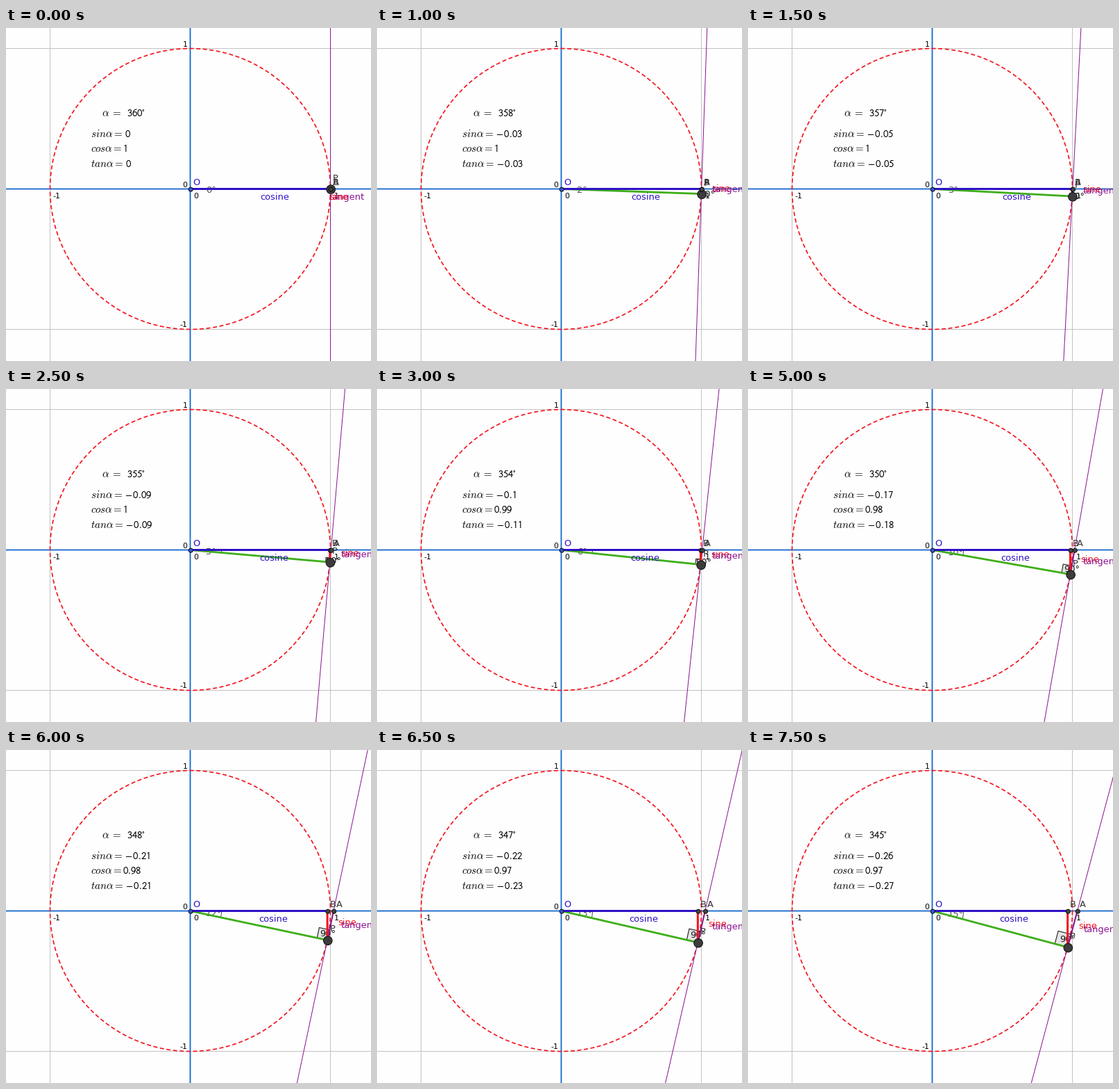
These frames come from a looping animation (526 by 479 pixels, 8000 ms). A matplotlib script:

```python
import matplotlib.pyplot as plt
import numpy as np
from matplotlib.animation import FuncAnimation

W, H, DPI = 526, 479, 64
PT = 72 / DPI                      # points per pixel
OX, OY, R = 265.5, 231.5, 202      # centre and radius of the unit circle
BLUE, GREEN, RED, PURPLE = "#2e12c6", "#3fae1a", "#f5141e", "#8a1490"
AXIS, DARK = "#1467cc", "#333333"

plt.rcParams.update({"font.family": "DejaVu Sans", "mathtext.fontset": "cm",
                     "path.snap": False})

fig = plt.figure(figsize=(W / DPI, H / DPI), dpi=DPI, facecolor="#fefefe")
ax = fig.add_axes([0, 0, 1, 1])


def line(xs, ys, color, width, z=3, **kw):
    kw.setdefault("solid_capstyle", "butt")
    ax.plot(xs, ys, color=color, lw=width * PT, zorder=z, **kw)


def text(x, y, s, color="black", size=13, z=7, **kw):
    ax.text(x, y, s, color=color, fontsize=size * PT, ha="left",
            va="baseline", zorder=z, **kw)


def sans_math(x, y, s):
    text(x, y, f"${s}$", size=14.7, math_fontfamily="stixsans")


def dot(x, y, r, fill):
    ax.add_patch(plt.Circle((x + 0.7, y + 0.7), r, fc=fill, ec="#101010",
                            lw=PT, zorder=6))


def number(v):
    s = f"{v:.2f}".rstrip("0").rstrip(".")
    return "0" if s == "-0" else s.replace("-", r"-\,")


def draw_plane():
    for x in (63.5, 467.5):
        line([x, x], [0, H], "#c2c2c2", 1, 1)
    for y in (29.5, 433.5):
        line([0, W], [y, y], "#c2c2c2", 1, 1)
    line([0, W], [OY, OY], AXIS, 1.8, 1)
    line([OX, OX], [0, H], AXIS, 1.8, 1)
    t = np.linspace(0, 2 * np.pi, 400)
    line(OX + R * np.cos(t), OY + R * np.sin(t), RED, 1.7, 2,
         dashes=(3.5, 2.15), dash_capstyle="butt")
    for x, y, s in ((254.5, 27, "1"), (254.5, 229, "0"), (250.5, 430.5, "-1"),
                    (67.5, 245, "-1"), (270.5, 245, "0"), (472.5, 245, "1")):
        text(x, y, s, size=11)


def draw_readout(n):
    a = np.radians(n)
    text(138.5, 127, r"$\alpha\;=$", size=15)
    sans_math(173.5, 127, rf"\mathsf{{{360 - n}}}\!{{}}^\circ")
    rows = (("sin", -np.sin(a), 171, 157), ("cos", np.cos(a), 168.5, 178),
            ("tan", -np.tan(a), 171.5, 200))
    for name, v, x, y in rows:
        text(122.5, y, rf"${name}\alpha=$", size=15)
        sans_math(x, y, rf"\mathsf{{{number(v)}}}")


def draw_angles(n, px, py):
    a = np.radians(n)
    c, s = np.cos(a), np.sin(a)
    text(288, 236.5 + 0.22 * n, f"{n}°", "#505058", z=2)
    if n == 0:
        return
    t = np.linspace(0, a, 20)
    line(OX + 45 * np.cos(t), OY + 45 * np.sin(t), "#505058", 1, 2)
    # right-angle mark between the radius and the tangent
    k = 0.354 * R * np.tan(a)
    xs = [px, px - k * c, px - k * c + k * s, px + k * s]
    ys = [py, py - k * s, py - k * s - k * c, py - k * c]
    ax.fill(xs, ys, color="black", alpha=0.1, lw=0, zorder=2)
    line(xs[1:], ys[1:], "#202020", 1.1, 2)
    text(466 - 1.13 * n, 238 + 2.5 * n, "90°", "#111111", z=2)


def draw_segments(n, px, py, qx):
    a = np.radians(n)
    reach = np.array([-500, 500])
    line(px + reach * np.sin(a), py - reach * np.cos(a), PURPLE, 1, 3)
    line([OX, px], [OY, py], GREEN, 2.8, 4)
    line([px, qx], [py, OY], PURPLE, 2, 4)
    line([px, px], [py, OY], RED, 3, 4)
    line([OX, px], [OY, OY], BLUE, 3, 5)

    dot(px, py, 6.3, "#3c3c3c")
    dot(OX, OY, 3, "#3a55c8")
    for x in (px, qx):
        dot(x, OY, 3, "#444444")

    text(269, 226, "O", BLUE)
    text(px + 3.5, 226, "B", DARK)
    text(qx + 3.5, 226, "A", DARK)
    text(px + 3.5, py - 12, "P", DARK)
    text((OX + px) / 2 - 0.5, 247, "cosine", BLUE)
    mid = (OY + py) / 2
    if n:
        text(px + 15.3, mid - 0.5, "sine", RED)
        text((px + qx) / 2 + 15.5, mid + 0.8 + 0.23 * n, "tangent", PURPLE)
    else:
        text(466, 247, "tangent", PURPLE)
        text(466, 247, "sine", RED)


def draw(n):
    ax.clear()
    ax.set(xlim=(0, W), ylim=(H, 0))
    ax.axis("off")
    a = np.radians(n)
    px, py, qx = OX + R * np.cos(a), OY + R * np.sin(a), OX + R / np.cos(a)
    draw_plane()
    draw_readout(n)
    draw_angles(n, px, py)
    draw_segments(n, px, py, qx)
    return []


anim = FuncAnimation(fig, draw, frames=16, interval=500, repeat=True,
                     repeat_delay=0, init_func=lambda: draw(0), blit=False)
plt.show()
```
